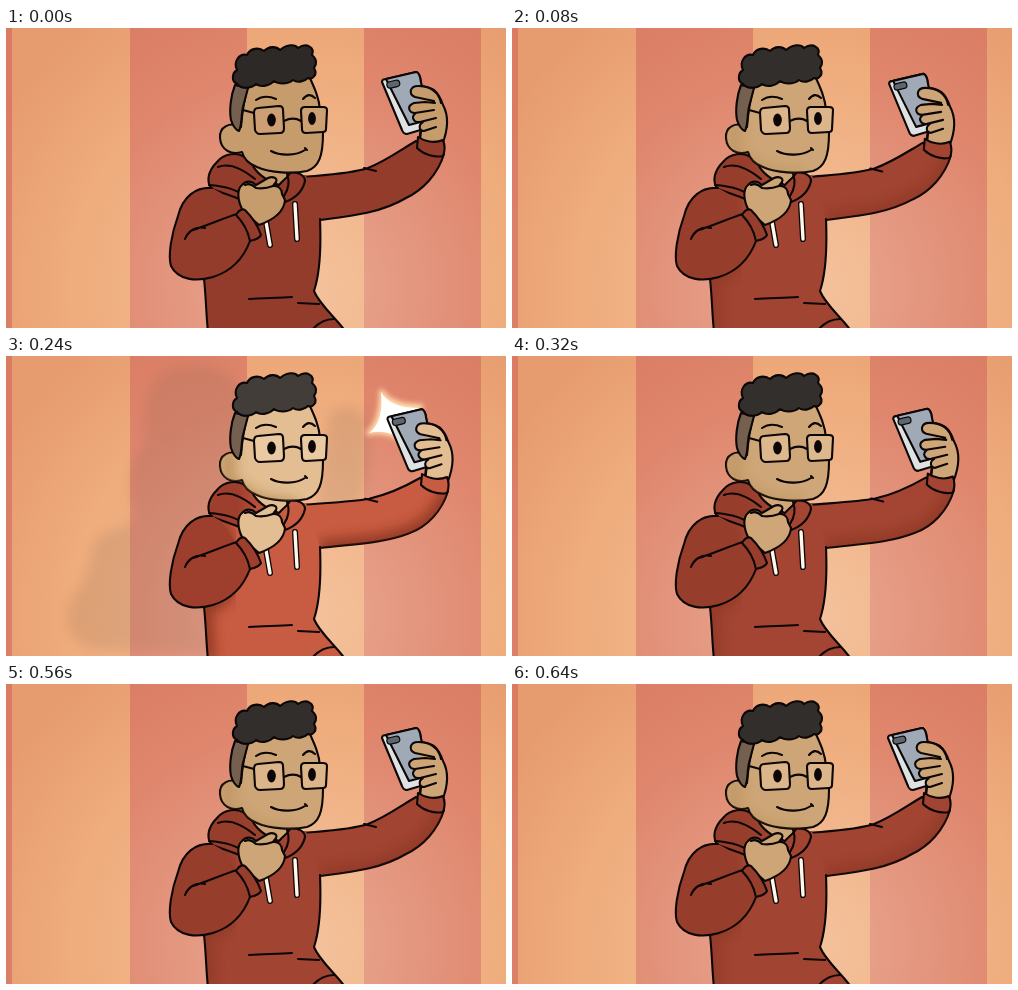
An HTML page that plays this animation: 500x300 px, repeating every 0.72 s.

```html
<!DOCTYPE html>
<html lang="en">
<head>
<meta charset="utf-8">
<title>Selfie</title>
<style>
  html, body { margin: 0; width: 100%; height: 100%; overflow: hidden; }
  svg { display: block; width: 500px; height: 300px; }
  .ink { stroke: #0c0706; stroke-width: 2.1; stroke-linejoin: round; stroke-linecap: round; }
  .line { fill: none; }
  .cloth { fill: var(--cloth); }
  .dim { fill: var(--dim); }
  .skin { fill: var(--skin); }
  .lens { fill: var(--lens); }
  .hair { fill: var(--hair); }
  .soft { fill: none; stroke: #6a2410; stroke-width: 16; filter: url(#blur); opacity: var(--shade); }
  .flash { opacity: var(--flash); }
</style>
</head>
<body>
<svg viewBox="0 0 500 300">
  <defs>
    <filter id="blur" x="-20%" y="-20%" width="140%" height="140%"><feGaussianBlur stdDeviation="6"/></filter>
    <filter id="glow" x="-40%" y="-40%" width="180%" height="180%"><feGaussianBlur stdDeviation="2.5"/></filter>
    <radialGradient id="light" gradientUnits="userSpaceOnUse" cx="290" cy="260" r="340">
      <stop offset="0" stop-color="#fff0e0" stop-opacity=".34"/>
      <stop offset=".65" stop-color="#fff0e0" stop-opacity="0"/>
      <stop offset=".66" stop-color="#b8462a" stop-opacity="0"/>
      <stop offset="1" stop-color="#b8462a" stop-opacity=".16"/>
    </radialGradient>
    <linearGradient id="hoodFill">
      <stop offset=".3" stop-color="var(--dim)"/>
      <stop offset=".65" stop-color="var(--cloth)"/>
    </linearGradient>
    <path id="armShape"/>
    <path id="torso" d="M205,160 C190,180 192,225 198,250 C200,268 200,285 202,304 L340,304 C328,288 313,276 308,263 C314,245 315,215 314,191 L300,147 L240,150 Z"/>
    <path id="face" d="M242,58 C238,72 236,86 235,99 C224,93 213,99 214,110 C215,123 226,127 236,124 C238,132 243,136 251,139 C264,145 287,146 301,143 C313,139 317,128 317,105 L314,82 C313,70 309,61 303,48 Z"/>
    <clipPath id="armClip"><use href="#armShape"/></clipPath>
    <clipPath id="torsoClip"><use href="#torso"/></clipPath>
    <clipPath id="faceClip"><use href="#face"/></clipPath>
  </defs>

  <rect width="500" height="300" fill="#efac7c"/>
  <path d="M0,0H6V300H0Z M124,0H241V300H124Z M358,0H475V300H358Z" fill="#df866d"/>
  <rect width="500" height="300" fill="url(#light)"/>

  <g class="flash">
    <path d="M95,294 C66,290 54,270 66,242 C84,222 84,200 90,184 C104,170 122,176 128,158 C118,130 124,105 138,88 C134,50 142,10 180,9 C225,4 242,30 240,70 L225,300 Z M322,60 C330,46 362,48 362,72 C362,100 366,150 340,160 L310,150 Z" fill="#806050" opacity=".16" filter="url(#blur)"/>
    <path d="M375,34 Q384,50 415,50 L405,90 L386,79 Q374,74 361,78 Q376,66 375,34Z" fill="#ffe3b5" stroke="#ffd6a6" stroke-width="4" filter="url(#glow)"/>
    <path d="M375,36 Q384,52 412,52 L402,88 L386,78 Q374,74 363,77 Q378,66 375,36Z" fill="#fff"/>
  </g>

  <!-- raised arm -->
  <use href="#armShape" class="cloth ink"/>
  <g clip-path="url(#armClip)"><path id="armShade" class="soft"/></g>
  <path id="crease" class="ink line"/>

  <g id="phone">
    <path class="skin ink" d="M413,115 L415,99 L408,80 L405,63 C409,56 419,57 428,62 C433,66 435,71 437,77 C443,88 442,102 436,117 Z"/>
    <path class="ink" fill="#dfe2e2" d="M376,54 C376,52 378,51 380,51 L410,44 C412,44 413,46 414,49 L422,97 L421,100 L401,106 C398,106 397,105 396,102 Z"/>
    <path class="ink" fill="#a0aab7" d="M380,51 L410,44 C412,44 413,46 414,49 L422,92 L403,97 Z"/>
    <rect x="381" y="53" width="13" height="6.5" rx="3.2" transform="rotate(-13 387 57)" fill="#5d6570" class="ink" style="stroke-width:1.2"/>
    <path class="skin" d="M405,63 C409,57 420,58 429,64 L437,84 L435,108 L415,103 C412,98 416,95 418,93 C409,95 405,88 410,84 C401,84 401,76 409,74 L416,72 C408,70 402,68 405,63Z"/>
    <path class="ink line" d="M428,73 L409,69 C402,66 404,58 412,58 C424,58 433,64 435,75 M429,75 L419,74 L408,75 C400,78 403,85 409,85 L428,82 M410,85 C404,89 408,95 414,94 L430,90 M417,94 C412,97 413,103 418,103 L430,99 M415,103 L414,112"/>
  </g>
  <path id="cuff" class="cloth ink"/>

  <!-- body -->
  <use href="#torso" class="cloth"/>
  <g clip-path="url(#torsoClip)"><path class="soft" d="M202,304 L198,250 C235,245 225,200 215,165"/></g>
  <path class="ink line" d="M198,251 C200,268 200,285 202,304 M314,191 C315,215 314,245 308,263 C313,276 328,288 340,304 M243,271 C258,270 272,270 286,269 M292,275 L313,276 M306,302 C312,295 319,291 328,291"/>
  <path class="ink" fill="url(#hoodFill)" d="M206,161 C199,153 203,142 211,134 C218,125 231,124 239,129 C247,139 260,143 281,144 C291,143 299,147 299,153 C297,162 290,170 279,174 L250,178 C232,170 215,164 206,161Z"/>
  <path class="skin ink" d="M246,136 L285,143 C283,149 277,152 273,157 C262,153 251,147 246,136Z"/>
  <path class="ink line" d="M212,139 C224,134 238,142 249,151 M203,157 C217,158 231,161 240,169 M281,146 C284,154 282,162 278,168"/>
  <g fill="none" stroke-linecap="round">
    <path d="M260,194 L264,217 M289,176 L291,211" stroke="#0c0706" stroke-width="6"/>
    <path d="M260,194 L264,217 M289,176 L291,211" stroke="#fff6ec" stroke-width="3.4"/>
  </g>

  <!-- head -->
  <use href="#face" class="skin ink"/>
  <g clip-path="url(#faceClip)"><path class="soft" stroke-width="10" style="stroke:#a87840" d="M222,92 L222,124 C244,148 270,150 290,150"/></g>
  <path class="ink" fill="#75604f" d="M229,57 C225,67 223,82 225,92 C227,98 230,102 233,103 C236,98 235,88 237,79 L242,60Z"/>
  <path class="hair ink" d="M231,56 C225,53 226,45 231,42 C227,34 233,25 241,27 C244,20 253,19 258,23 C263,18 270,18 274,22 C281,16 289,16 292,20 C301,14 309,20 306,27 C311,31 311,36 308,40 C312,46 307,52 302,50 C298,54 291,55 287,52 C281,57 272,56 268,53 C262,59 254,59 250,56 C245,61 235,61 231,56Z"/>
  <path class="ink line" d="M250,72 C256,68 263,68 270,71 M297,71 C301,66 305,66 309,70"/>
  <path class="lens ink" d="M252,80 L273,78 C276,78 277,79 277,82 L278,100 C278,103 277,105 274,105 L254,106 C251,106 250,105 249,102 L248,85 C248,82 249,80 252,80Z M299,79 L317,79 C320,79 321,80 321,82 L320,101 C320,103 319,104 317,104 L300,105 C297,105 296,104 296,101 L295,83 C295,81 296,79 299,79Z"/>
  <g fill="#0c0706">
    <ellipse cx="265.5" cy="92" rx="4.3" ry="6.4"/>
    <ellipse cx="306" cy="90.5" rx="3.9" ry="6.4"/>
  </g>
  <path class="ink line" d="M278,93 C284,90 290,90 295,93 M248,85 L237,82 M265,123 C274,128 290,128 299,122 M299,120 L301,122"/>

  <!-- folded arm -->
  <path class="dim" d="M206,160 C190,159 177,168 172,188 C165,207 162,228 165,238 C172,252 190,254 207,249 C226,243 238,229 244,213 L254,208 C252,198 245,185 237,180 L230,187 L215,165 Z"/>
  <path class="ink line" d="M206,160 C190,159 177,168 172,188 C165,207 162,228 165,238 C172,252 190,254 207,249 C226,243 238,229 244,213 M179,211 C182,203 190,198 199,200 M187,202 C202,197 218,190 231,186"/>
  <path class="skin ink" d="M237,183 C231,172 231,161 236,157 C240,152 246,153 250,157 L262,150 C267,148 272,150 270,154 L267,158 C273,157 276,162 276,166 L279,172 C278,184 267,192 253,197 Z"/>
  <path class="ink line" d="M239,157 C243,155 247,157 250,160 C256,161 262,160 267,158"/>
  <path class="dim ink" d="M230,187 C232,183 236,180 239,182 C246,189 252,198 255,207 C253,211 248,212 244,213 C242,203 237,194 230,187Z"/>
</svg>
<script>
  const STEP = 80;
  const drop = [0, .2, .6, 1, .95, 0, 0, 0, 0];
  const glow = [0, .25, .3, 1, .28, .25, .25, .25, .25];
  const root = document.documentElement.style;
  const attr = (id, name, value) => document.getElementById(id).setAttribute(name, value);
  const mix = (a, b, t) => `rgb(${a.map((v, i) => Math.round(v + (b[i] - v) * t))})`;

  function pose(k) {
    // p: a point carried part (w) of the way with the hand
    const p = (x, y, w = 1) => `${x + 4 * k * w},${y + 9 * k * w}`;
    const under = `${p(438, 126)} C${p(432, 146)} ${p(417, 162)} ${p(400, 170, .8)} C${p(375, 185, .3)} 345,188 314,192`;
    attr('armShape', 'd',
      `M296,149 C318,147 344,146 ${p(362, 140, .3)} C${p(380, 133, .6)} ${p(396, 121)} ${p(410, 113)} L${under} L290,175 Z`);
    attr('armShade', 'd', `M${under}`);
    attr('crease', 'd', `M${p(358, 140, .3)} L${p(370, 143, .3)}`);
    attr('cuff', 'd',
      `M${p(412, 109)} C${p(418, 113)} ${p(428, 116)} ${p(437, 112)} ` +
      `C${p(439, 117)} ${p(439, 123)} ${p(437, 128)} C${p(428, 130)} ${p(417, 126)} ${p(411, 120)} Z`);
    attr('phone', 'transform', `translate(${5.5 * k} ${9.3 * k})`);
  }

  function light(g, n) {
    const set = (name, value) => root.setProperty('--' + name, value);
    set('cloth', mix([148, 60, 44], [200, 92, 66], g));
    set('dim', mix([148, 60, 44], [158, 62, 44], g));
    set('skin', mix([198, 156, 109], [226, 190, 146], g));
    set('lens', mix([205, 160, 115], [234, 202, 162], Math.min(1, g * 2)));
    set('hair', mix([44, 41, 39], [66, 61, 57], g));
    set('shade', Math.min(.55, g));
    set('flash', n === 3 ? 1 : 0);
  }

  let last = -1;
  function draw(now) {
    const n = Math.floor(now / STEP) % drop.length;
    if (n !== last) {
      pose(drop[n]);
      light(glow[n], n);
      last = n;
    }
    requestAnimationFrame(draw);
  }
  draw(0);
</script>
</body>
</html>
```
